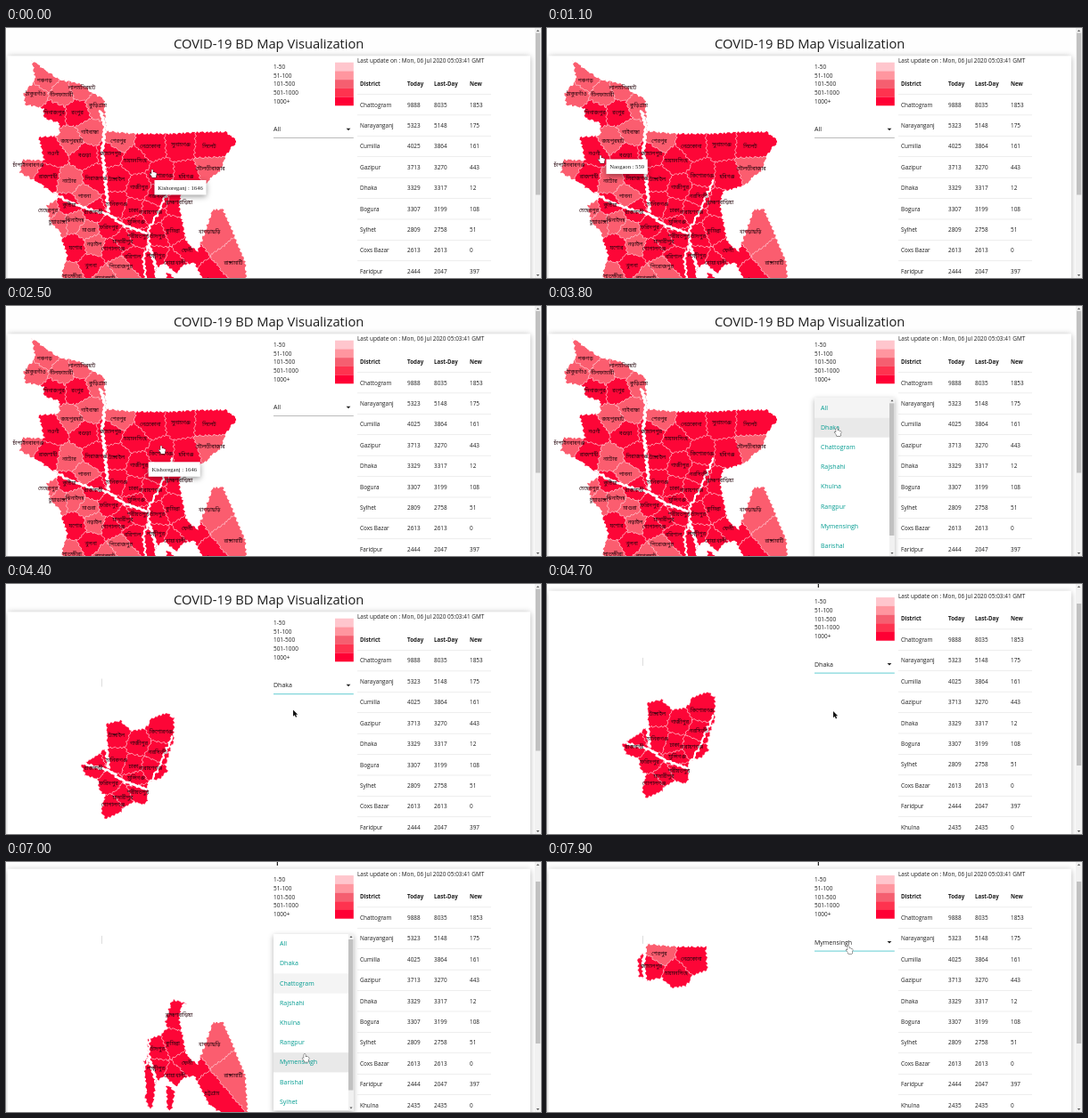
Recreate the animation shown at these times as an HTML page with a canvas. Size 600 by 281 pixels, loop 8 s.

```html
<!DOCTYPE html>
<html lang="en">
<head>
<meta charset="utf-8">
<title>COVID-19 BD Map Visualization</title>
<style>
html, body { margin: 0; width: 100%; height: 100%; overflow: hidden; background: #fefefe; }
canvas { display: block; width: 100vw; height: 100vh; }
</style>
</head>
<body>
<canvas id="stage"></canvas>
<script>
const W = 600, H = 281, LOOP = 8000, SCROLL = 23.6;
const canvas = document.getElementById('stage');
const ctx = canvas.getContext('2d');
const SANS = '"Open Sans", "Noto Sans", sans-serif';
const SERIF = '"Liberation Serif", serif';
const BANGLA = '"Noto Sans Bengali", "Noto Sans", sans-serif';
const LEVELS = ['#ffc6cd', '#ff969f', '#f55f70', '#fe334f', '#ff0034'];
const PALE = '#fb5d6f', DEEP = '#fd0637', INK = '#1c1c1c';
let unit = 1;

// Each district: label (* = lower count), position, then name and count for the tooltip.
const DIVISIONS = {
  Rangpur: 'পঞ্চগড়* 43 59;ঠাকুরগাঁও* 33 74;নীলফামারী* 62 75;লালমনিরহাট* 85 67;দিনাজপুর 54 95;রংপুর 80 95;কুড়িগ্রাম* 103 87;গাইবান্ধা* 94 117',
  Rajshahi: 'চাঁপাইনবাবগঞ্জ* 25 154;নওগাঁ 53 141 Naogaon 559;জয়পুরহাট* 74 127 Joypurhat 384;বগুড়া 88 143 Bogura 3307;রাজশাহী 47 167;নাটোর* 71 172 Natore 281;সিরাজগঞ্জ 101 169 Sirajganj 1146;পাবনা* 88 189',
  Mymensingh: 'শেরপুর* 126 127 Sherpur 246;জামালপুর 117 141 Jamalpur 631;ময়মনসিংহ 145 149 Mymensingh 1552;নেত্রকোনা 162 133 Netrokona 531',
  Sylhet: 'সুনামগঞ্জ 196 131;সিলেট 228 133;মৌলভীবাজার* 229 158 Moulvibazar 460;হবিগঞ্জ 202 167 Habiganj 756',
  Dhaka: 'টাঙ্গাইল 124 170 Tangail 867;কিশোরগঞ্জ 174 166 Kishoreganj 1646;গাজীপুর 149 179 Gazipur 3713;নরসিংদী 170 189 Narsingdi 1638;মানিকগঞ্জ 124 198 Manikganj 735;ঢাকা 143 205 Dhaka 3329;নারায়ণগঞ্জ 162 207 Narayanganj 5323;মুন্সিগঞ্জ 146 218;রাজবাড়ী 98 207;ফরিদপুর 115 224;শরীয়তপুর 148 234;মাদারীপুর 131 240;গোপালগঞ্জ 120 248',
  Chattogram: 'ব্রাহ্মণবাড়িয়া 194 196;কুমিল্লা 187 228;চাঁদপুর 170 234;লক্ষ্মীপুর 168 256;নোয়াখালী 189 264;ফেনী 203 250;খাগড়াছড়ি* 228 229;রাঙ্গামাটি* 255 264;চট্টগ্রাম 231 284',
  Khulna: 'মেহেরপুর* 47 205;চুয়াডাঙ্গা* 58 218;কুষ্টিয়া 71 199;ঝিনাইদহ* 77 216;মাগুরা* 93 227;নড়াইল* 99 243;যশোর 78 247;খুলনা 95 267;বাগেরহাট* 111 281;সাতক্ষীরা* 74 279',
  Barishal: 'বরিশাল 142 257;পিরোজপুর* 129 268'
};
const COAST = [
  '29,36 46,49 60,58 84,63 98,74 110,80 112,116 145,119 185,119 215,117 247,117 259,127 247,142 240,160 222,176 197,184 194,200 202,240 215,252 222,232 232,204 243,204 256,234 268,262 272,320 245,308 228,296 212,264 200,266 190,276 178,263 168,271 164,300 66,310 63,274 69,257 60,228 50,218 46,200 60,190 34,172 16,163 19,148 43,149 37,123 60,121 60,107 43,101 42,90 22,86 20,74 33,58',
  '180,274 189,281 186,302 181,302'
];
const RIVERS = [
  [3, '106,92 111,112 108,138 112,177 115,207'],
  [2.6, '54,186 70,195 94,204 116,210 132,222 158,231'],
  [2, '187,170 172,205 160,226 160,244 154,258 157,284'],
  [3, '160,242 166,262 174,290']
];
const OPTIONS = ['All', 'Dhaka', 'Chattogram', 'Rajshahi', 'Khulna', 'Rangpur', 'Mymensingh', 'Barishal', 'Sylhet'];
const ROWS = [
  'Chattogram 9888 8035', 'Narayanganj 5323 5148', 'Cumilla 4025 3864', 'Gazipur 3713 3270',
  'Dhaka 3329 3317', 'Bogura 3307 3199', 'Sylhet 2809 2758', 'Coxs_Bazar 2613 2613',
  'Faridpur 2444 2047', 'Khulna 2435 2435'
].map(r => {
  const [name, today, last] = r.split(' ');
  return [name.replace('_', ' '), today, last, today - last];
});

// Cursor moves: start, end, x, y. Menus: opened, closed, picked.
const MOVES = [
  [0, 0, 164, 159], [200, 950, 69, 126], [950, 1100, 60, 143], [1150, 2200, 161, 200],
  [2200, 2360, 150, 166], [2360, 2500, 174, 157], [2500, 2900, 321, 115], [3300, 3700, 325, 137],
  [4200, 4500, 321, 143], [4800, 5100, 333, 92], [5400, 5650, 334, 132], [5850, 6300, 335, 93],
  [6650, 7050, 335, 221], [7250, 7800, 338, 94]
];
const MENUS = [[3080, 3980, 'Dhaka'], [5330, 5740, 'Chattogram'], [6560, 7250, 'Mymensingh']];

const clamp = v => Math.max(0, Math.min(1, v));
const ease = v => { v = clamp(v); return v * v * (3 - 2 * v); };
const points = s => s.split(' ').map(p => p.split(',').map(Number));

// A smooth position-based offset roughens borders while keeping shared ones joined.
function rough([x, y]) {
  return [x + 0.9 * Math.sin(y * 1.1 + x * 0.5) + 0.4 * Math.sin(y * 2.7),
          y + 0.8 * Math.sin(x * 1.2 - y * 0.6) + 0.4 * Math.sin(x * 2.5)];
}
function trace(path, pts, closed) {
  const n = closed ? pts.length : pts.length - 1;
  path.moveTo(...rough(pts[0]));
  for (let i = 0; i < n; i++) {
    const [ax, ay] = pts[i], [bx, by] = pts[(i + 1) % pts.length];
    const steps = Math.ceil(Math.hypot(bx - ax, by - ay)) || 1;
    for (let s = 1; s <= steps; s++) {
      const f = s / steps;
      path.lineTo(...rough([ax + (bx - ax) * f, ay + (by - ay) * f]));
    }
  }
  if (closed) path.closePath();
}
// Keep the part of a polygon nearer to a than to b.
function nearer(poly, a, b) {
  const side = ([x, y]) => (x - (a.x + b.x) / 2) * (b.x - a.x) + (y - (a.y + b.y) / 2) * (b.y - a.y);
  const out = [];
  poly.forEach((p, i) => {
    const q = poly[(i + 1) % poly.length], dp = side(p), dq = side(q);
    if (dp <= 0) out.push(p);
    if (dp * dq < 0) {
      const f = dp / (dp - dq);
      out.push([p[0] + (q[0] - p[0]) * f, p[1] + (q[1] - p[1]) * f]);
    }
  });
  return out;
}

const places = Object.entries(DIVISIONS).flatMap(([division, list]) =>
  list.split(';').map(s => {
    const [label, x, y, name, count] = s.split(' ');
    return {
      division, x: +x, y: +y, label: label.replace('*', ''),
      color: label.endsWith('*') ? PALE : DEEP,
      tip: name && `${name} : ${count}`
    };
  }));
for (const a of places) {
  let poly = [[0, 20], [290, 20], [290, 325], [0, 325]];
  for (const b of places) if (b !== a) poly = nearer(poly, a, b);
  a.cell = new Path2D();
  trace(a.cell, poly, true);
}
const land = new Path2D();
COAST.forEach(s => trace(land, points(s), true));
const rivers = RIVERS.map(([width, s]) => {
  const path = new Path2D();
  trace(path, points(s), false);
  return { width, path };
});

function text(s, x, y, size, color = INK, family = SANS, weight = 500) {
  ctx.font = `${weight} ${size}px ${family}`;
  ctx.fillStyle = color;
  ctx.fillText(s, x, y);
}
function box(x, y, w, h, color) {
  ctx.fillStyle = color;
  ctx.fillRect(x, y, w, h);
}
function raised(x, y, w, h, blur, alpha, dy) {
  ctx.save();
  ctx.shadowColor = `rgba(0,0,0,${alpha})`;
  ctx.shadowBlur = blur * unit;
  ctx.shadowOffsetY = dy * unit;
  box(x, y, w, h, '#fff');
  ctx.restore();
}
function triangle(x, y, w, h, color) {
  ctx.fillStyle = color;
  ctx.beginPath();
  ctx.moveTo(x - w / 2, y);
  ctx.lineTo(x + w / 2, y);
  ctx.lineTo(x, y + h);
  ctx.fill();
}

function drawMap(choice) {
  const shown = places.filter(p => choice === 'All' || p.division === choice);
  ctx.save();
  ctx.clip(land);
  for (const p of shown) {
    ctx.fillStyle = p.color;
    ctx.fill(p.cell);
  }
  ctx.strokeStyle = 'rgba(255,205,212,.7)';
  ctx.lineWidth = 0.45;
  for (const p of shown) ctx.stroke(p.cell);
  ctx.strokeStyle = '#fff';
  ctx.lineJoin = 'round';
  for (const r of rivers) {
    ctx.lineWidth = r.width;
    ctx.stroke(r.path);
  }
  ctx.restore();
  ctx.textAlign = 'center';
  for (const p of shown) text(p.label, p.x, p.y + 2, 5.9, '#25050c', BANGLA, 400);
  ctx.textAlign = 'left';
  if (choice !== 'All') box(107.2, 106.5, 0.5, 9, '#bbb');
}

function drawPanel(choice, focused) {
  text('Last update on : Mon, 06 Jul 2020 05:03:41 GMT', 394, 39.2, 6.45);
  ['1-50', '51-100', '101-500', '501-1000', '1000+'].forEach((s, i) => {
    text(s, 300, 46 + i * 9.65, 6.45);
    box(369, 38.7 + i * 9.7, 20.8, 9.8, LEVELS[i]);
  });
  text(choice, 300, 116.1, 7);
  triangle(384, 112.7, 4.8, 2.5, '#222');
  if (focused) box(300, 123.2, 89.8, 1, '#63cdd2');
  else box(300, 123.3, 89.8, 0.5, '#777');

  const cols = [397, 450, 480, 520];
  ['District', 'Today', 'Last-Day', 'New'].forEach((s, i) =>
    text(s, cols[i], 64.9, 6.2, INK, SANS, 700));
  ROWS.forEach((row, r) => {
    const y = 86.2 + r * 23.42;
    box(394, y - 12, 150, 0.5, '#dcdcdc');
    row.forEach((s, i) => text(s, cols[i], y + 2.3, 6.4));
  });
}

function cursorAt(t) {
  let x = 0, y = 0;
  for (const [start, end, tx, ty] of MOVES) {
    if (t < start) break;
    const f = end > start ? ease((t - start) / (end - start)) : 1;
    x += (tx - x) * f;
    y += (ty - y) * f;
  }
  return [x, y];
}
function placeAt([x, y]) {
  const dist = p => Math.hypot(p.x - x, p.y - y);
  const best = places.reduce((a, b) => dist(b) < dist(a) ? b : a);
  return dist(best) < 30 ? best : null;
}
// The tooltip stays where the cursor entered the district.
function drawTip(place, t) {
  let entry = t;
  while (entry > 0 && placeAt(cursorAt(entry - 10)) === place) entry -= 10;
  const [cx, cy] = cursorAt(Math.max(0, entry));
  const x = cx + 2.5, y = cy + 12;
  ctx.font = `400 6.6px ${SERIF}`;
  raised(x, y, ctx.measureText(place.tip).width + 7.5, 16.5, 6, 0.4, 2);
  text(place.tip, x + 3.7, y + 10.6, 6.6, INK, SERIF, 400);
}

function drawMenu(top, bottom, open, choice, cursorY) {
  const row = 22.2, h = bottom - top;
  ctx.save();
  ctx.globalAlpha = open;
  ctx.translate(345, top + 11);
  ctx.scale(0.75 + 0.25 * open, 0.56 + 0.44 * open);
  ctx.translate(-345, -top - 11);
  raised(300, top, 90, h, 6, 0.3, 2);
  ctx.beginPath();
  ctx.rect(300, top, 90, h);
  ctx.clip();
  OPTIONS.forEach((s, i) => {
    const y = top + i * row;
    if (cursorY >= y && cursorY < y + row) box(300, y, 84, row, '#e9e9e9');
    else if (s === choice) box(300, y, 84, row, '#f4f4f4');
    text(s, 307, y + 13.2, 7, '#009b90');
  });
  box(384, top, 6, h, '#f1f1f1');
  box(384, top + 6, 5.4, h - 29, '#c1c1c1');
  triangle(387, top + 4, 3, -2, '#555');
  triangle(387, bottom - 4, 3, 2, '#555');
  ctx.restore();
}

function drawScrollbar(scroll) {
  box(593, 0, 7, H, '#f1f1f1');
  box(594, 5.5 + scroll * 0.7, 5.2, 182, '#c1c1c1');
  triangle(596.5, 4, 3.4, -2, '#666');
  triangle(596.5, 277, 3.4, 2, '#555');
}

const ARROW = new Path2D('M0 0V7.2L1.7 5.7 2.9 8.4 4.2 7.8 3 5.2H5.2Z');
const HAND = new Path2D('M-.8.5Q0-.4.8.5V3.2L2 3 3.1 3.4 4.2 3.7Q5 4 4.8 5.2L4.2 7.4V9H-.4V7.8L-2.6 5.2Q-2.8 4.2-1.8 4.4L-.8 5.3Z');
function drawCursor(x, y, hand) {
  ctx.save();
  ctx.translate(x, y);
  ctx.lineJoin = 'round';
  ctx.lineWidth = 0.8;
  ctx.strokeStyle = hand ? '#111' : '#fff';
  ctx.fillStyle = hand ? '#fff' : '#111';
  const shape = hand ? HAND : ARROW;
  ctx.stroke(shape);
  ctx.fill(shape);
  ctx.restore();
}

function draw(t) {
  const scroll = SCROLL * ease((t - 4400) / 250);
  const picked = MENUS.filter(m => m[1] <= t).pop();
  const choice = picked ? picked[2] : 'All';
  const [x, y] = cursorAt(t);
  const menu = MENUS.find(([a, b]) => t >= a && t < b + 220);
  const place = placeAt([x, y]);

  box(0, 0, W, H, '#fefefe');
  ctx.save();
  ctx.translate(0, -scroll);
  text('COVID-19 BD Map Visualization', 188, 23.4, 14.7);
  raised(1.5, 31.3, 586.5, 400, 7, 0.33, 1);
  drawPanel(choice, t >= MENUS[0][0]);
  drawMap(choice);
  ctx.restore();

  if (place && place.tip) drawTip(place, t);
  drawScrollbar(scroll);
  if (menu) {
    const open = ease((t - menu[0]) / 240) * (1 - ease((t - menu[1]) / 200));
    drawMenu(scroll ? 81 : 103.3, scroll ? 279.5 : 281, open, choice, y);
  }
  const onSelect = x > 300 && x < 390 && Math.abs(y - 114 + scroll) < 10.5;
  drawCursor(x, y, place || (menu && t < menu[1]) || onSelect);
}

function frame(now) {
  const dpr = window.devicePixelRatio || 1;
  const w = Math.round(innerWidth * dpr), h = Math.round(innerHeight * dpr);
  if (canvas.width !== w || canvas.height !== h) {
    canvas.width = w;
    canvas.height = h;
  }
  unit = w / W;
  ctx.setTransform(unit, 0, 0, h / H, 0, 0);
  draw(now % LOOP);
  requestAnimationFrame(frame);
}
requestAnimationFrame(frame);
</script>
</body>
</html>
```
